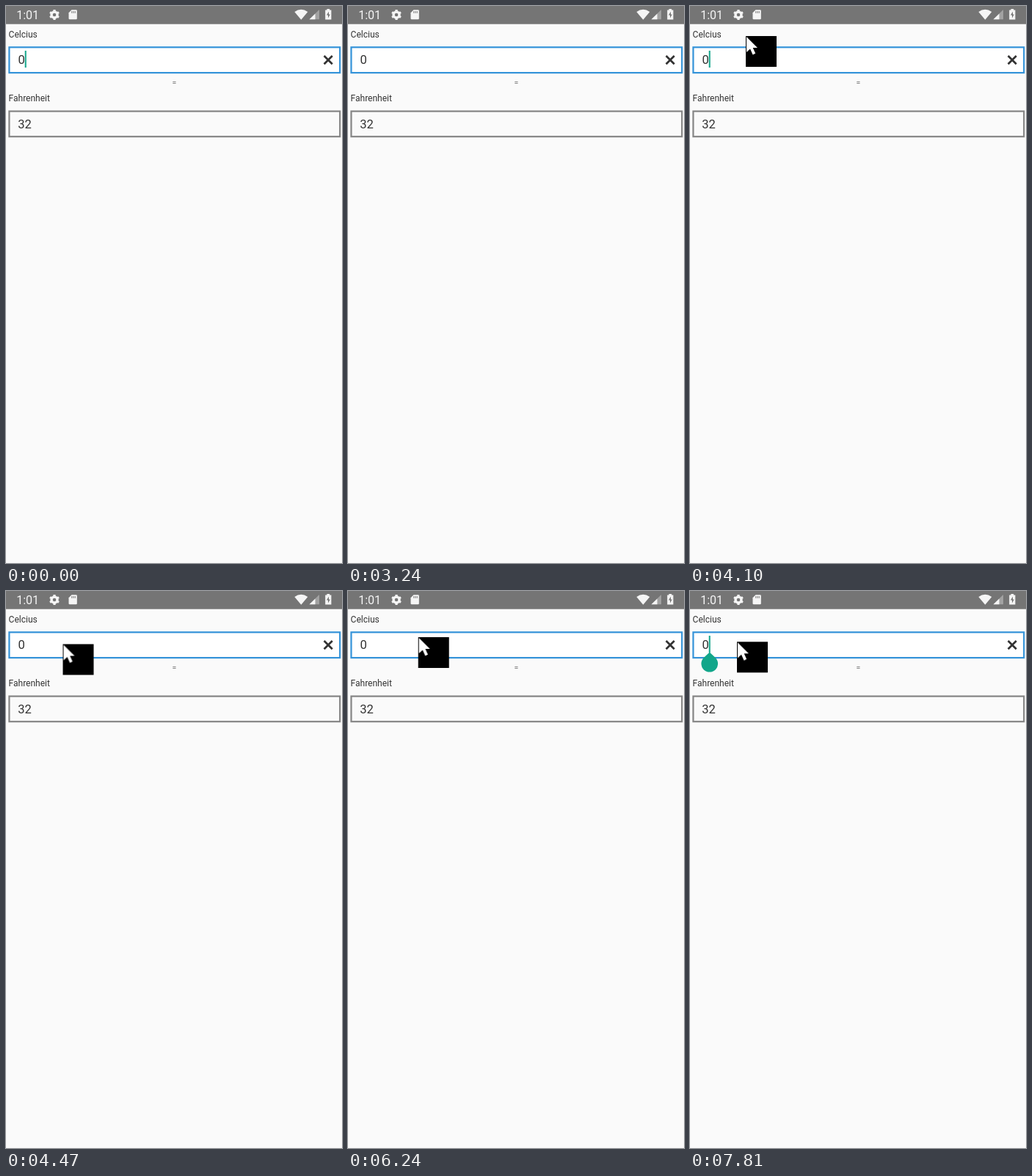
Animation, 458 px wide and 760 px high, one loop 8000 ms. Source, as an HTML page:

```html
<!DOCTYPE html>
<html lang="en">
<head>
<meta charset="utf-8">
<title>Temperature converter</title>
<style>
  html, body { margin: 0; width: 100%; height: 100%; overflow: hidden; background: #fafafa; }
  svg { display: block; width: 458px; height: 760px; }
  text { font-family: Roboto, sans-serif; fill: #333; }
  .label { font-size: 12px; }
  .value { font-size: 16.5px; }
  .field { fill: #fff; stroke-width: 2.2; }

  .caret, .handle, .pointer { animation: 8s step-end infinite; }
  .caret { animation-name: blink; }
  .handle { animation-name: show; }
  .pointer { animation-name: move; }

  @keyframes blink {
    0%, 9.625%, 22.125%, 34.25%, 47.125%, 59.625%, 71.75%, 83.875%, 96.375% { opacity: 1; }
    3.375%, 15.5%, 28%, 40.5%, 53%, 65.875%, 78%, 90%  { opacity: 0; }
    100% { opacity: 1; }
  }
  @keyframes show {
    0% { opacity: 0; }
    83.875%, 100% { opacity: 1; }
  }
  /* Moves in 30 fps steps, entering twice from above the screen */
  @keyframes move {
    0% { transform: translate(79px, -60px); }
    50.417% { transform: translate(79px, -28px); animation-timing-function: steps(2); }
    51.25% { transform: translate(76px, 41px); animation-timing-function: steps(5); }
    53.375% { transform: translate(82px, 88px); animation-timing-function: steps(6); }
    55.875% { transform: translate(77.5px, 72.5px); }
    58.75% { transform: translate(205px, -60px); }
    74.25% { transform: translate(205px, -28px); animation-timing-function: steps(3); }
    75.5% { transform: translate(168px, 14px); animation-timing-function: steps(3); }
    76.75% { transform: translate(131px, 44px); animation-timing-function: steps(3); }
    78% { transform: translate(95.7px, 63px); animation-timing-function: steps(3); }
    79.25%, 100% { transform: translate(64px, 69.3px); }
  }
</style>
</head>
<body>
<svg viewBox="0 0 458 760">
  <rect width="458" height="760" fill="#fafafa"/>

  <!-- Status bar -->
  <rect width="458" height="24.7" fill="#757575"/>
  <g fill="#f5f5f5">
    <text x="14.2" y="18" font-size="16" style="fill:#f5f5f5">1:01</text>
    <g transform="translate(66 12)">
      <circle r="4" fill="none" stroke="#f5f5f5" stroke-width="3.4"/>
      <path d="M0-7V-4M0 4V7M-6-3.5-3.5-2M3.5 2 6 3.5M-6 3.5-3.5 2M3.5-2 6-3.5" stroke="#f5f5f5" stroke-width="3.2"/>
    </g>
    <path d="M89.5 5.3H95.5Q96.8 5.3 96.8 6.6V17Q96.8 18.3 95.5 18.3H86.8Q85.5 18.3 85.5 17V9.3Z"/>
    <path d="M89.8 7V9.8M92 7V9.8M94.2 7V9.8" stroke="#757575"/>
    <path d="M393.3 8Q402.3 1.6 411.3 8L402.3 18.8Z"/>
    <path d="M427 5V18.3H413.5Z" opacity=".35"/>
    <path d="M421.5 10.4V18.3H413.5Z"/>
    <path d="M437.4 4H441.2V5.4H443.4V18.6H435.2V5.4H437.4Z"/>
    <path d="M440 7.6 437 12.6H439V16.4L441.8 11.4H440Z" fill="#757575"/>
  </g>

  <text class="label" x="3.6" y="43">Celcius</text>
  <rect class="field" x="4.4" y="56.3" width="450.8" height="34.8" stroke="#3493d9"/>
  <text class="value" x="16.5" y="79">0</text>
  <path d="M433.6 68 444.8 79.2M444.8 68 433.6 79.2" stroke="#333" stroke-width="2.7"/>

  <text x="229.5" y="108" font-size="10.5" text-anchor="middle" style="fill:#777">=</text>

  <text class="label" x="3.6" y="130.3">Fahrenheit</text>
  <rect class="field" x="4.4" y="143.6" width="450.8" height="34.6" stroke="#858585" style="fill:#fafafa"/>
  <text class="value" x="16.3" y="166.5">32</text>

  <rect class="caret" x="25.7" y="61" width="2" height="23" fill="#12a68a"/>
  <path class="handle" d="M26.7 83.4 34.6 91.1A11.3 11.3 0 1 1 18.8 91.1Z" fill="#12a68a"/>

  <g class="pointer">
    <rect width="42" height="42"/>
    <path d="M1 1V22L6 17.4 9.6 25.4 13.2 23.8 9.7 16H16Z" fill="#fff"/>
  </g>
</svg>
</body>
</html>
```
